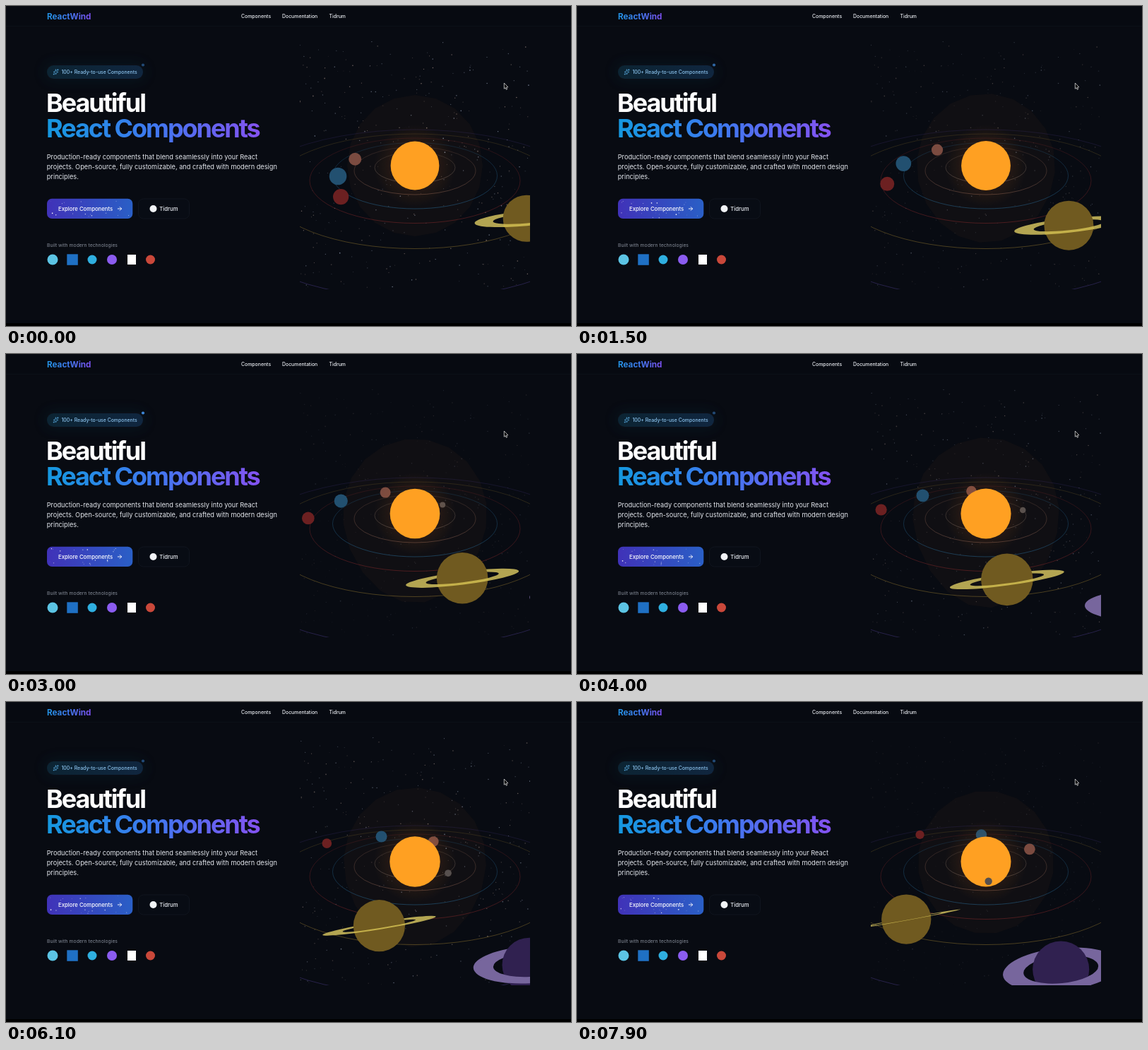
An HTML page with a canvas for the animation above (8000 ms loop, 800 px wide and 453 px high).

```html
<!DOCTYPE html>
<html lang="en">
<head>
<meta charset="utf-8">
<title>ReactWind</title>
<style>
  html, body { margin: 0; width: 100%; height: 100%; overflow: hidden; background: #080b12; }
  svg, canvas { position: absolute; left: 0; top: 0; width: 800px; height: 453px; }
  text { font-family: Inter, sans-serif; font-weight: 500; font-size: 6.9px; fill: #eceff4; }
  .brand { font-size: 11.7px; font-weight: 700; fill: url(#brand); }
  .headline { font-size: 36px; font-weight: 700; letter-spacing: -2.05px; }
  .lead { font-size: 9.23px; font-weight: 400; fill: #e4e7ed; }
  .button { font-size: 7.75px; }
</style>
</head>
<body>
<svg viewBox="0 0 800 453">
  <defs>
    <linearGradient id="brand" gradientUnits="userSpaceOnUse" x1="58" x2="120">
      <stop stop-color="#2292e2"/><stop offset=".5" stop-color="#3f78ee"/><stop offset="1" stop-color="#7a4fee"/>
    </linearGradient>
    <linearGradient id="title" gradientUnits="userSpaceOnUse" x1="58" x2="360">
      <stop stop-color="#1598df"/><stop offset=".5" stop-color="#3f78f0"/><stop offset="1" stop-color="#8452f0"/>
    </linearGradient>
    <linearGradient id="cta"><stop stop-color="#4032b8"/><stop offset="1" stop-color="#2a5fc6"/></linearGradient>
    <linearGradient id="pill"><stop stop-color="#0c2433"/><stop offset="1" stop-color="#10263f"/></linearGradient>
    <filter id="soft" x="-30%" y="-150%" width="160%" height="400%"><feGaussianBlur stdDeviation="9"/></filter>
  </defs>

  <rect width="800" height="28" fill="#070a11"/>
  <path d="M0 28.5H800" stroke="#0c1018"/>
  <rect y="449" width="800" height="4" fill="#000"/>
  <text class="brand" x="58" y="18.8">ReactWind</text>
  <text x="333" y="17">Components</text>
  <text x="391" y="17">Documentation</text>
  <text x="457.5" y="17">Tidrum</text>

  <rect x="56" y="82" width="140" height="23" rx="11" fill="#0c2c3c" opacity=".3" filter="url(#soft)"/>
  <rect x="58" y="84" width="136" height="19" rx="9.5" fill="url(#pill)"/>
  <path d="M70.5 90l.9 2.5 2.5 1-2.5 1-.9 2.5-.9-2.5-2.5-1 2.5-1zM73.3 89.5v1.8M72.4 90.4h1.8M67.8 95.8v1.4M67.1 96.5h1.4"
    fill="none" stroke="#58a9dc" stroke-width=".75" stroke-linecap="round" stroke-linejoin="round"/>
  <text x="78.5" y="96" style="fill:#8cc4ef">100+ Ready-to-use Components</text>
  <circle id="pulse" cx="194" cy="83.5" r="2.1" fill="#3d86d6"/>

  <text class="headline" x="57" y="150.2" style="fill:#fff">Beautiful</text>
  <text class="headline" x="57" y="186.3" style="fill:url(#title)">React Components</text>
  <text class="lead" x="57.7" y="217.2">Production-ready components that blend seamlessly into your React</text>
  <text class="lead" x="57.7" y="231.2">projects. Open-source, fully customizable, and crafted with modern design</text>
  <text class="lead" x="57.7" y="245.2">principles.</text>

  <rect x="58" y="272.7" width="121.3" height="28.3" rx="7" fill="url(#cta)"/>
  <g id="sparks" fill="#fff"></g>
  <text class="button" x="74" y="289.8" style="fill:#fff">Explore Components</text>
  <path d="M158.3 287h5.2m-2.3-2.4l2.4 2.4-2.4 2.4" fill="none" stroke="#fff" stroke-width=".9" stroke-linecap="round" stroke-linejoin="round"/>
  <rect x="187.5" y="273" width="72" height="28" rx="7" fill="#080c14" stroke="#10151e"/>
  <circle cx="208.5" cy="287" r="5" fill="#f2f4f7"/>
  <text class="button" x="217.3" y="289.8">Tidrum</text>

  <text x="58" y="340.6" style="font-size:6.85px;font-weight:400;fill:#858c98">Built with modern technologies</text>
  <circle cx="66" cy="359" r="7.5" fill="#5cc4e4"/>
  <rect x="86.3" y="351.3" width="15.5" height="15.5" fill="#1f70c4"/>
  <circle cx="122" cy="359" r="6.5" fill="#2fafe0"/>
  <circle cx="150" cy="359" r="7" fill="#8b5cf0"/>
  <rect x="172" y="352" width="12" height="14" fill="#fff"/>
  <circle cx="204.5" cy="359" r="6.5" fill="#c9483a"/>
</svg>
<canvas id="scene" width="800" height="453"></canvas>

<script>
const ctx = document.getElementById("scene").getContext("2d");
const pulse = document.getElementById("pulse");
const TAU = Math.PI * 2, RAD = Math.PI / 180;
const SUN = { x: 579, y: 226 };

function randomFrom(seed) {
  return () => (seed = seed * 16807 % 2147483647) / 2147483647;
}

// Orbit lines: horizontal radius, top, bottom, colour.
const orbits = [
  [57, 207, 250.5, "130,112,100"],
  [86, 199.5, 267, "140,98,82"],
  [116.5, 193.5, 287, "42,112,158"],
  [149, 187, 307.5, "140,42,44"],
  [207, 181, 343.5, "150,122,48"],
  [273, 175, 414, "76,60,140"]
];

// radius: flat orbit; near: perspective strength; rise, lean, lift: vertical placing;
// start and speed in degrees.
const planets = [
  { radius: 55.7, near: .15, rise: 22.3, lean: -1.7, lift: 1.7, start: -117, speed: 25.8, size: 4.4, color: "#57504e" },
  { radius: 84, near: .225, rise: 32, lean: 5.1, lift: -5.5, start: 177.5, speed: 18.8, size: 8.9, color: "#7b4b40" },
  { radius: 111.6, near: .3, rise: 37.1, lean: 2.9, lift: -9.3, start: 143.2, speed: 15.5, size: 10.1, color: "#225070" },
  { radius: 140, near: .378, rise: 46.7, lean: -.6, lift: -16.2, start: 120.3, speed: 12.05, size: 7.5, color: "#6c2021" },
  { radius: 189, near: .45, rise: 51.4, lean: 3.3, lift: 0, start: 59.2, speed: 6.45, size: 20.3, color: "#705a20",
    ring: { color: "#b3a552", front: "#c4b04a", width: 2.22, height: t => 10.5 - .14 * t * t, tilt: t => -5.2 - .65 * t } },
  { radius: 242, near: .53, rise: 110, lean: 41.8, lift: -88.8, start: 45.4, speed: 4.1, size: 19.3, color: "#302150",
    ring: { color: "#77669d", front: "#77669d", width: 2.06, height: t => 12 + 2.3 * t, tilt: t => 6 - 1.5 * t } }
];

const rand = randomFrom(4211);
const stars = Array.from({ length: 330 }, () => ({
  x: 414 + rand() * 326, y: 50 + rand() * 351, r: .4 + rand() * .45,
  glow: .3 + rand() * .7, color: rand() < .5 ? "#8d98ad" : "#9a8780"
}));

const sparkGroup = document.getElementById("sparks");
const sparks = Array.from({ length: 24 }, () => {
  const dot = document.createElementNS("http://www.w3.org/2000/svg", "circle");
  dot.setAttribute("r", .35 + rand() * .5);
  sparkGroup.append(dot);
  const upper = rand() < .5;
  return { dot, x: 63 + rand() * 111, y: (upper ? 274.5 : 292.5) + rand() * 6.5, phase: rand() * TAU };
});

function disc(x, y, r, fill) {
  ctx.beginPath();
  ctx.arc(x, y, r, 0, TAU);
  ctx.fillStyle = fill;
  ctx.fill();
}

function drawStars(t) {
  const brightness = .5 + .3 * Math.cos(t * TAU / 5.3);
  for (const s of stars) {
    ctx.globalAlpha = brightness * s.glow;
    disc(s.x + t * .3, s.y, s.r, s.color);
  }
  ctx.globalAlpha = 1;
}

function drawHalo(t) {
  const swell = .5 - .5 * Math.cos(t * TAU / 8.6);
  ctx.beginPath();
  for (let i = 0; i < 20; i++) {
    const a = (i / 20) * TAU + t * .06;
    const down = Math.max(0, Math.sin(a));
    const r = 96 + 8 * swell;
    ctx.lineTo(SUN.x + Math.cos(a) * r, SUN.y + Math.sin(a) * (r + 4 + down * 26 * swell));
  }
  ctx.fillStyle = "rgba(255,130,60,.036)";
  ctx.fill();
}

function drawOrbits() {
  ctx.lineWidth = .85;
  for (const [rx, top, bottom, rgb] of orbits) {
    const shade = ctx.createLinearGradient(0, top, 0, bottom);
    shade.addColorStop(0, `rgba(${rgb},.24)`);
    shade.addColorStop(1, `rgba(${rgb},.56)`);
    ctx.strokeStyle = shade;
    ctx.beginPath();
    ctx.ellipse(SUN.x, (top + bottom) / 2, rx, (bottom - top) / 2, 0, 0, TAU);
    ctx.stroke();
  }
}

function drawSun(t) {
  const glow = ctx.createRadialGradient(SUN.x, SUN.y, 32, SUN.x, SUN.y, 58);
  glow.addColorStop(0, "rgba(255,130,30,.09)");
  glow.addColorStop(1, "rgba(255,130,30,0)");
  disc(SUN.x, SUN.y, 58, glow);
  disc(SUN.x, SUN.y, 34.4 + 1.3 * Math.sin(t * .27), "#ffa022");
}

function drawRing(ring, t, x, y, r, frontOnly) {
  const rx = r * ring.width, ry = ring.height(t);
  ctx.save();
  ctx.translate(x, y);
  ctx.rotate(ring.tilt(t) * RAD);
  if (frontOnly) {
    ctx.beginPath();
    ctx.rect(-r, 0, r * 2, ry + 2);
    ctx.clip();
  }
  ctx.beginPath();
  for (const scale of [1, .645]) {
    ctx.moveTo(rx * scale, 0);
    ctx.ellipse(0, 0, rx * scale, ry * scale, 0, 0, TAU);
  }
  ctx.fillStyle = frontOnly ? ring.front : ring.color;
  ctx.fill("evenodd");
  ctx.restore();
}

function drawPlanet(p, t) {
  const angle = (p.start + p.speed * t) * RAD;
  const scale = 1 / (1 - p.near * Math.sin(angle));
  const x = SUN.x + p.radius * Math.cos(angle) * scale;
  const y = SUN.y + (p.rise * Math.sin(angle) + p.lean * Math.cos(angle)) * scale + p.lift;
  const r = p.size * scale;
  if (p.ring) drawRing(p.ring, t, x, y, r, false);
  disc(x, y, r, p.color);
  if (p.ring) drawRing(p.ring, t, x, y, r, true);
}

function drawCursor() {
  ctx.beginPath();
  for (const [x, y] of [[0, 0], [0, 8.2], [1.8, 6.6], [3, 9.3], [4.3, 8.7], [3.1, 6.1], [5.5, 5.9]]) {
    ctx.lineTo(705.3 + x, 109 + y);
  }
  ctx.closePath();
  ctx.fillStyle = "#000";
  ctx.strokeStyle = "#e8e8e8";
  ctx.lineWidth = .75;
  ctx.fill();
  ctx.stroke();
}

function render(t) {
  ctx.clearRect(0, 0, 800, 453);
  ctx.save();
  ctx.beginPath();
  ctx.rect(416, 50, 326, 351);
  ctx.clip();
  drawStars(t);
  drawHalo(t);
  drawOrbits();
  const isBehind = p => Math.sin((p.start + p.speed * t) * RAD) < 0;
  planets.filter(isBehind).forEach(p => drawPlanet(p, t));
  drawSun(t);
  planets.filter(p => !isBehind(p)).forEach(p => drawPlanet(p, t));
  ctx.restore();
  drawCursor();

  pulse.setAttribute("opacity", .75 - .25 * Math.cos(t * Math.PI));
  for (const { dot, x, y, phase } of sparks) {
    dot.setAttribute("cx", x + 2 * Math.sin(t * 1.3 + phase));
    dot.setAttribute("cy", y + Math.cos(t * 1.7 + phase));
    dot.setAttribute("opacity", .5 + .5 * Math.sin(t * 3 + phase));
  }
}

// Ten pictures a second, with a short hold at the start of the loop.
function tick() {
  const step = Math.floor(performance.now() % 8000 / 100);
  render(step < 3 ? 0 : step / 10);
  requestAnimationFrame(tick);
}
tick();
</script>
</body>
</html>
```
